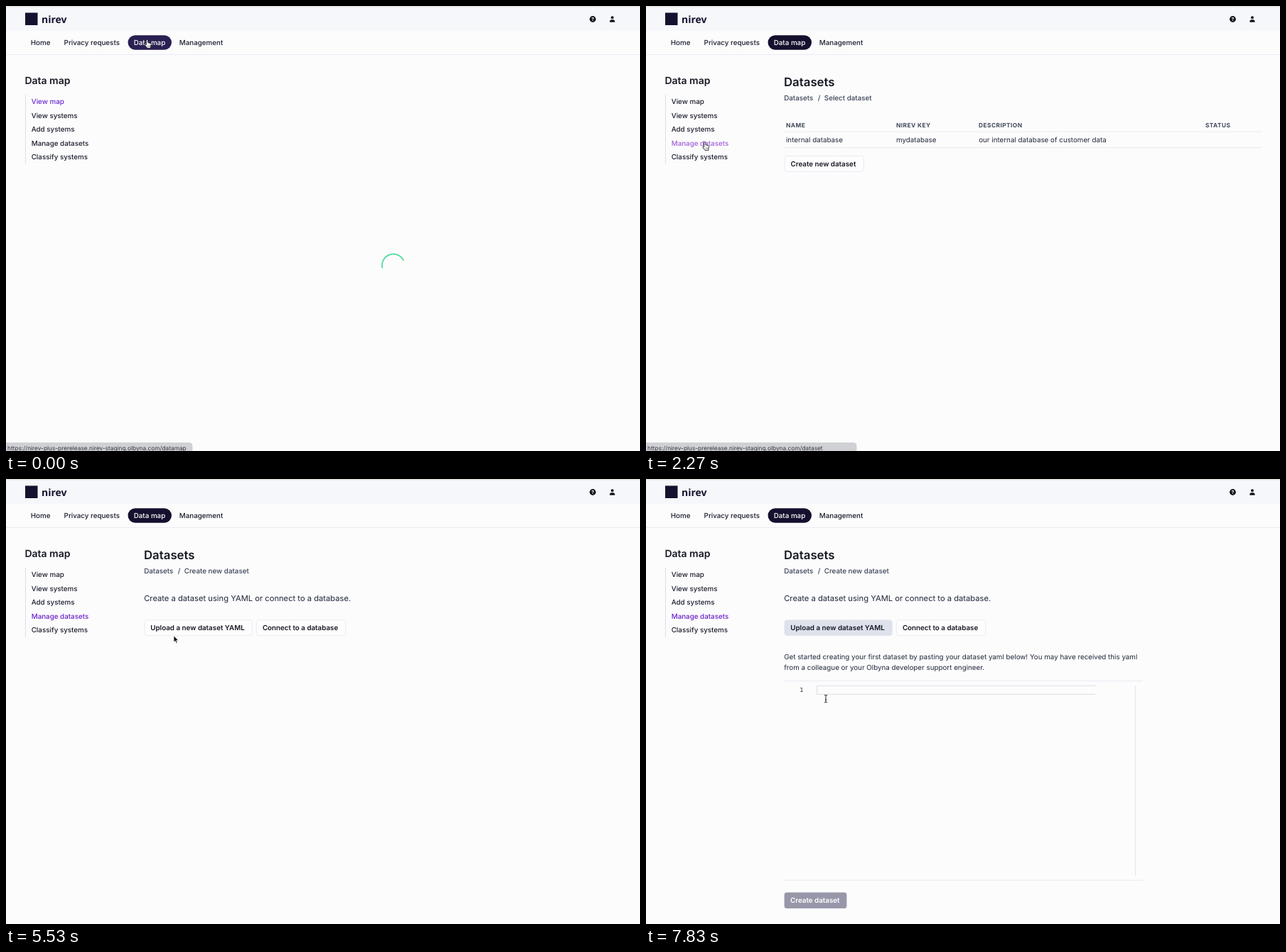
Write an HTML page that moves like this. It is 892x627 px and loops after 8000 ms.

```html
<!DOCTYPE html>
<html lang="en">
<head>
<meta charset="utf-8">
<title>Datasets</title>
<style>
  html, body { margin: 0; width: 100%; height: 100%; overflow: hidden; background: #fcfcfd; }
  svg { display: block; }
  text { font: 400 9.8px Inter, sans-serif; fill: #22283a; text-rendering: geometricPrecision; white-space: pre; }
  .nav { font-weight: 500; fill: #1a1d2b; }
  .h1 { font-weight: 600; font-size: 16.8px; fill: #171923; }
  .h2 { font-weight: 600; font-size: 14px; fill: #171923; }
  .crumb { font-weight: 500; fill: #394255; }
  .th { font-weight: 700; font-size: 8.4px; letter-spacing: .42px; fill: #414a5c; }
  .big { font-size: 11.2px; }
  .btn { font-weight: 600; fill: #171923; }
  .white { fill: #fff; }
  .url { font-size: 8.3px; fill: #34373d; }
  .logo { font: 700 14px "Open Sans", sans-serif; fill: #14122f; }
  .code { font: 8.4px "DejaVu Sans Mono", monospace; }
  .line { stroke: #e8ebf1; fill: none; }
  .box { fill: #fdfdfe; stroke: #e2e6ee; stroke-width: .8; }
</style>
</head>
<body>
<svg id="stage" width="892" height="627" viewBox="0 0 892 627">
  <rect width="892" height="627" fill="#fcfcfd"/>
  <rect width="892" height="35" fill="#f6f7fa"/>
  <rect width="892" height="1.5" fill="#dfe2d8"/>
  <path class="line" d="M0 68.5H892"/>
  <rect x="27" y="9.5" width="17.5" height="17.5" fill="#14122f"/>
  <text class="logo" x="50" y="24">nirev</text>
  <circle cx="825.5" cy="18.5" r="4.4" fill="#14151f"/>
  <text x="825.5" y="21.1" text-anchor="middle" style="font-size:7px;font-weight:700;fill:#fff">?</text>
  <circle cx="853" cy="16.3" r="2" fill="#14151f"/>
  <path d="M849.4 22.8v-1q0-2.6 2.6-2.6h2q2.6 0 2.6 2.6v1z" fill="#14151f"/>
  <rect id="pill" x="171.5" y="41.2" width="61.5" height="20.6" rx="10.3"/>
  <path d="M27.4 124.5V222.5" stroke="#dcdfe7"/>

  <g id="map">
    <path id="spin" d="M533.3 352.9A15.9 15.9 0 0 1 555.7 375.3" fill="none" stroke="#38d98a" stroke-width="1.5"/>
  </g>
  <g id="list">
    <path class="line" d="M194.6 177.2H866M194.6 199.6H866"/>
    <rect id="newBtn" class="box" x="194.9" y="211.3" width="111.4" height="22" rx="3.5"/>
  </g>
  <g id="create">
    <rect id="upBtn" class="box" x="194.9" y="198.7" width="151.4" height="22" rx="3.5"/>
    <rect id="ring" x="193.6" y="197.5" width="154" height="24.6" rx="4.5" fill="none" stroke="#73b8e3" stroke-width="2"/>
    <rect class="box" x="352.3" y="198.7" width="125.6" height="22" rx="3.5"/>
  </g>
  <g id="form">
    <path class="line" d="M194.6 284.5H699M194.6 565.3H699"/>
    <rect x="194.6" y="582.5" width="87.8" height="22.4" rx="3.5" fill="#9897aa"/>
  </g>
  <g id="load"></g>
  <g id="editor">
    <path d="M632 291.3H240.6V303.3H632" fill="none" stroke="#e3e4e6" stroke-width="1.3"/>
    <path d="M688.6 291V559" stroke="#e2e1f1"/>
  </g>

  <g id="status">
    <path id="bubble" fill="#cfd1d5" stroke="#bfc2c6" stroke-width=".6"/>
    <text id="url" class="url" x="2" y="626"></text>
  </g>
  <circle id="halo" r="21.5" fill="#eedc48"/>
  <g id="mouse" stroke-linejoin="round">
    <g id="hand">
      <path d="M-1.1 1A1.1 1.1 0 0 1 1.1 1V4.2L4.6 4.9Q6 5.3 5.8 6.8L5 10.2V11.8H.2L-2.9 7.8Q-3.5 6.4-2 6.6L-1.1 7.4Z" fill="#fff" stroke="#1c1c22" stroke-width=".9"/>
      <path d="M1 8V10M2.5 8V10M4 8V10" stroke="#1c1c22" stroke-width=".5"/>
    </g>
    <path id="arrow" d="M0 0V9.2L2.1 7.3 3.5 10.6 5.1 9.9 3.7 6.7H6.5Z" fill="#111" stroke="#fff" stroke-width=".7"/>
    <path id="beam" d="M-2-5.2Q0-5.2 0-4Q0-5.2 2-5.2M0-4V4.2M-2 5.4Q0 5.4 0 4.2Q0 5.4 2 5.4M-1 1.6H1" fill="none" stroke="#222"/>
  </g>
</svg>
<script>
const LOOP = 8000;
const $ = id => document.getElementById(id);

function label(parent, cls, x, y, str) {
  const el = document.createElementNS("http://www.w3.org/2000/svg", "text");
  el.setAttribute("class", cls);
  el.setAttribute("x", x);
  el.setAttribute("y", y);
  el.textContent = str;
  parent.append(el);
  return el;
}

// Static text; shared parts go just after the pill so overlays stay on top.
const base = document.createElementNS("http://www.w3.org/2000/svg", "g");
$("map").before(base);
label(base, "nav", 34.8, 55, "Home");
label(base, "nav", 81.6, 55, "Privacy requests");
label(base, "nav white", 179.7, 55, "Data map");
label(base, "nav", 243.8, 55, "Management");
label(base, "h2", 26.4, 110, "Data map");
const links = ["View map", "View systems", "Add systems", "Manage datasets", "Classify systems"]
  .map((s, i) => label(base, "nav", 35.7, 138 + i * 19.6, s));
const title = [
  label(base, "h1", 194, 112.7, "Datasets"),
  label(base, "crumb", 194.2, 133.3, "Datasets"),
  label(base, "crumb", 241.8, 133.3, "/")
];

const list = $("list"), create = $("create"), form = $("form");
label(list, "crumb", 250.8, 133.3, "Select dataset");
label(list, "th", 197, 170.7, "NAME");
label(list, "th", 352, 170.7, "NIREV KEY");
label(list, "th", 468, 170.7, "DESCRIPTION");
label(list, "th", 787, 170.7, "STATUS");
label(list, "", 197, 191.7, "internal database");
label(list, "", 352, 191.7, "mydatabase");
label(list, "", 468.2, 191.7, "our internal database of customer data");
label(list, "btn", 203.5, 225.7, "Create new dataset");
label(create, "crumb", 250.8, 133.3, "Create new dataset");
label(create, "big", 194.2, 171.8, "Create a dataset using YAML or connect to a database.");
label(create, "btn", 203.3, 213.2, "Upload a new dataset YAML");
label(create, "btn", 360.9, 213.2, "Connect to a database");
label(form, "", 194.2, 254.3, "Get started creating your first dataset by pasting your dataset yaml below! You may have received this yaml");
label(form, "", 194.2, 269, "from a colleague or your Olbyna developer support engineer.");
label(form, "btn white", 203, 597.1, "Create dataset");
label($("load"), "big", 420.2, 428.6, "Loading...");
label($("editor"), "code", 216.3, 300.4, "1");

const LIST_AT = 1950, CREATE_AT = 5060, FORM_AT = 6760, EDITOR_AT = 7220;

// Cursor moves: start, end, from, to
const moves = [
  [40, 830, [198.5, 47.5], [82.8, 191.5]],
  [2700, 3500, [82.8, 191.5], [236, 220.8]],
  [5970, 6330, [236, 220.8], [263.5, 216.5]],
  [7430, 7830, [263.5, 216.5], [253, 309.5]]
];
const hands = [[0, 210], [745, 2790], [3230, CREATE_AT], [6040, 7480]];
const clicks = [1720, 4830, 6640];
// Status bubble: start, end, path, width
const hints = [
  [0, 480, "datamap", 262],
  [760, 1760, "dataset", 257],
  [1760, 2980, "dataset", 296],
  [3250, CREATE_AT + 60, "dataset/new", 276]
];

const within = (t, a, b) => t >= a && t < b;
const ramp = (t, a, b) => Math.min(1, Math.max(0, (t - a) / (b - a)));
const pulse = (t, a, b, d = 100) => ramp(t, a, a + d) * (1 - ramp(t, b - d, b));
const smooth = k => k * k * (3 - 2 * k);
const mix = (a, b, k) => `color-mix(in srgb, ${b} ${k * 100}%, ${a})`;
const show = (el, on) => el.style.display = on ? "" : "none";

function cursorAt(t) {
  let p = moves[0][2];
  for (const [a, b, from, to] of moves) {
    if (t < a) break;
    const k = smooth(ramp(t, a, b));
    p = from.map((v, i) => v + (to[i] - v) * k);
  }
  return p;
}

function draw(t) {
  show($("map"), t < LIST_AT);
  title.forEach(el => show(el, t >= LIST_AT));
  show(list, within(t, LIST_AT, CREATE_AT));
  show(create, t >= CREATE_AT);
  show(form, t >= FORM_AT);
  show($("load"), within(t, FORM_AT, EDITOR_AT));
  show($("editor"), t >= EDITOR_AT);
  $("spin").setAttribute("transform", `rotate(${t / 433 * 360 + 24 - 90 + 0} 544.5 364.1)`);

  $("pill").style.fill = mix("#2a2052", "#14102e", ramp(t, 210, 400));
  links[0].style.fill = t < LIST_AT ? "#6a29cf" : "";
  const over = ramp(t, 745, 900) * (1 - ramp(t, 2790, 2950));
  links[3].style.fill = t < LIST_AT ? mix("#1a1d2b", "#727a8a", over) : mix("#6a1fc9", "#a05ed8", over);

  $("newBtn").style.fill = mix("#fdfdfe", "#e9edf3", ramp(t, 3230, 3400));
  const up = t < FORM_AT - 60 ? mix("#fdfdfe", "#e9edf3", ramp(t, 6040, 6200)) : "#dde2eb";
  $("upBtn").style.fill = up;
  $("ring").style.opacity = ramp(t, 6680, 6780) * (1 - ramp(t, 7480, 7600));

  const hint = hints.find(h => within(t, h[0], h[1]));
  show($("status"), hint);
  if (hint) {
    const [, , path, w] = hint;
    $("bubble").setAttribute("d", `M-1 628V615.6H${w - 4}q4 0 4 4V628z`);
    $("url").textContent = "https://nirev-plus-prerelease.nirev-staging.olbyna.com/" + path;
  }

  const [x, y] = cursorAt(t), at = `translate(${x} ${y})`;
  const hand = hands.some(([a, b]) => within(t, a, b)), beam = t >= 7690;
  $("mouse").setAttribute("transform", at);
  show($("hand"), hand);
  show($("beam"), beam);
  show($("arrow"), !hand && !beam);
  $("halo").setAttribute("transform", at);
  $("halo").style.opacity = .62 * Math.max(...clicks.map(c => pulse(t, c, c + 480)));
}

const start = performance.now();
function tick(now) {
  draw(Math.max(0, now - start) % LOOP);
  requestAnimationFrame(tick);
}
draw(0);
requestAnimationFrame(tick);
</script>
</body>
</html>
```
